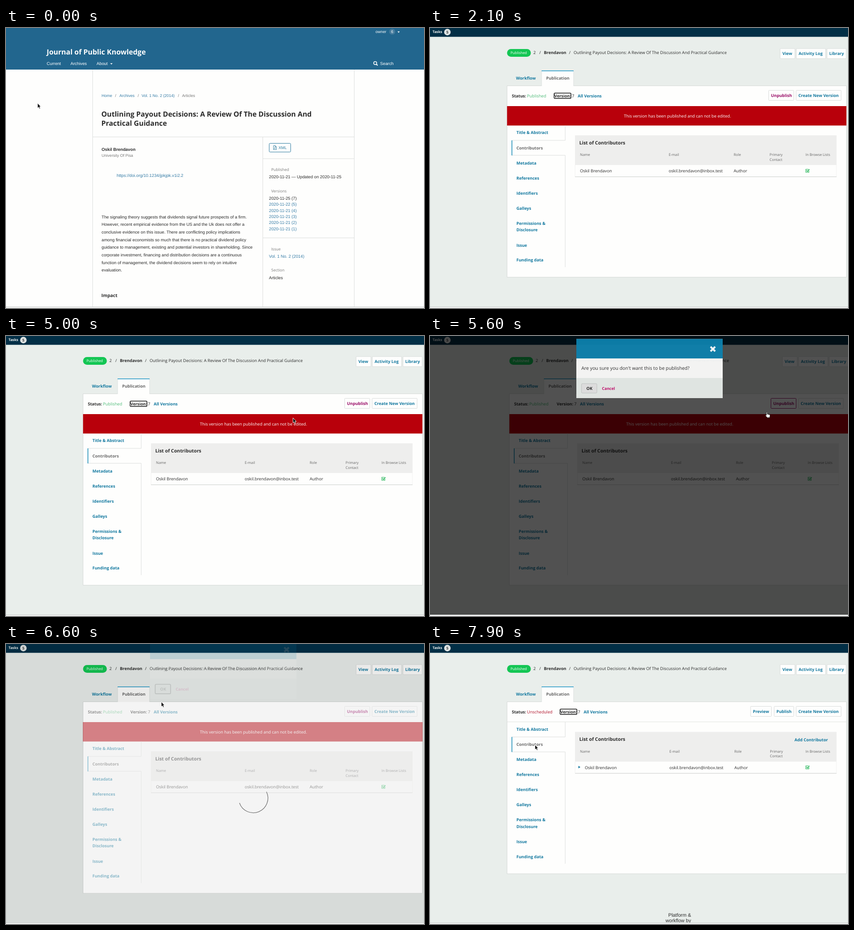
An HTML page for the animation above (8 s loop, 914 by 613 pixels).

```html
<!DOCTYPE html>
<html lang="en">
<head>
<meta charset="utf-8">
<title>Unpublishing a version</title>
<style>
html, body { margin: 0; width: 100%; height: 100%; overflow: hidden; background: #fefefd; }
svg { display: block; width: 914px; height: 613px; }
text { white-space: pre; text-rendering: geometricPrecision; }
.u { font-family: "Open Sans", "Noto Sans", sans-serif; }
.l { font-family: "Liberation Sans", Arial, sans-serif; }
</style>
</head>
<body>
<svg id="stage" viewBox="0 0 914 613" xmlns="http://www.w3.org/2000/svg"></svg>
<script>
const PAPER = '#fefefd', INK = '#2b2b2b', GREY = '#777', LINE = '#dcdedd';
const LINK = '#347ba6', BLUE = '#12789f', PINK = '#980a66';
const AUTHOR = 'Oskil Brendavon', EMAIL = 'oskil.brendavon@inbox.test';
const TITLE = ['Outlining Payout Decisions: A Review Of The Discussion And', 'Practical Guidance'];

// Markup helpers
const esc = s => s.replace(/&/g, '&amp;');
const text = (cls, x, y, s, size, fill, bold) =>
  `<text class="${cls}" x="${x}" y="${y}" font-size="${size}" fill="${fill}" font-weight="${bold ? 700 : 400}">${esc(s)}</text>`;
const L = (x, y, s, size = 9.28, fill = INK, bold) => text('l', x, y, s, size, fill, bold);
const U = (x, y, s, size = 9.13, fill = INK, bold) => text('u', x, y, s, size, fill, bold);
const B = (x, y, s, fill = BLUE, size = 9) => U(x, y, s, size, fill, true);
const box = (x, y, w, h, fill, extra = '') => `<rect x="${x}" y="${y}" width="${w}" height="${h}" fill="${fill}" ${extra}/>`;
const path = (d, stroke, width = 1, fill = 'none') => `<path d="${d}" stroke="${stroke}" stroke-width="${width}" fill="${fill}"/>`;
const group = (id, body) => `<g id="${id}">${body}</g>`;
const caret = (x, y) => path(`M${x} ${y}h5l-2.5 3z`, 'none', 0, '#fff');

function article() {
  const body = [
    'The signaling theory suggests that dividends signal future prospects of a firm.',
    'However, recent empirical evidence from the US and the Uk does not offer a',
    'conclusive evidence on this issue. There are conflicting policy implications',
    'among financial economists so much that there is no practical dividend policy',
    'guidance to management, existing and potential investors in shareholding. Since',
    'corporate investment, financing and distribution decisions are a continuous',
    'function of management, the dividend decisions seem to rely on intuitive',
    'evaluation.'];
  const versions = ['25 (7)', '22 (5)', '21 (4)', '21 (3)', '21 (2)', '21 (1)'];
  const label = (y, s) => U(580, y, s, 8.47, GREY);
  const crumb = (x, s, fill = LINK) => L(x, 151, s, 8.67, fill);
  return box(0, 0, 914, 613, PAPER) + box(0, 0, 914, 91, '#22668e') +
    L(808, 11, 'owner', 8.67, '#fff') +
    '<circle cx="844.5" cy="8" r="6.6" fill="#447b9d"/>' + L(842.1, 11, '6', 8.67, '#fff') + caret(856, 7.5) +
    U(89, 58, 'Journal of Public Knowledge', 15.57, '#fff', true) +
    L(89, 81, 'Current', 9.33, '#fff') + L(141, 81, 'Archives', 9.33, '#fff') +
    L(198, 81, 'About', 9.33, '#fff') + caret(228, 77) +
    '<circle cx="807.3" cy="76.8" r="3.3" fill="none" stroke="#fff" stroke-width="1.6"/>' +
    path('M809.8 79.2l2.8 2.8', '#fff', 2) + L(818, 81, 'Search', 9.33, '#fff') +
    path('M189.5 91V610M761.5 91V610M190 238.5H761M561.5 238V610M562 286H761M562 459.5H761', LINE) +
    crumb(209, 'Home') + crumb(238.5, '/', GREY) + crumb(248, 'Archives') + crumb(288, '/', GREY) +
    crumb(296.5, 'Vol. 1 No. 2 (2014)') + crumb(376, '/', GREY) + crumb(385, 'Articles', GREY) +
    TITLE.map((s, i) => U(208.5, 193.7 + i * 20, s, 15.45, INK, true)).join('') +
    L(209, 269, AUTHOR, 9.33, INK, true) + L(209, 282.3, 'University Of Pisa', 8.67, GREY) +
    L(242, 325.5, 'https://doi.org/10.1234/jpkjpk.v1i2.2', 9.28, LINK) +
    body.map((s, i) => L(209, 416.7 + i * 16.67, s)).join('') +
    U(208.5, 588.8, 'Impact', 10, INK, true) +
    box(575.5, 252.5, 47, 19, PAPER, 'rx="2" stroke="#2b7a9f"') +
    path('M584.9 257.7h4l2.3 2.4v6.2h-6.3zM588.7 257.7v2.6h2.5M586.3 264.8l1.5-3 2 2.4', '#2b7a9f', .9) +
    L(596, 265.2, 'XML', 8.67, '#2b7a9f') +
    label(313, 'Published') + L(575, 329.3, '2020-11-21 — Updated on 2020-11-25') +
    label(359.5, 'Versions') +
    versions.map((s, i) => L(575, 376 + i * 13.33, '2020-11-' + s, 9.28, i ? LINK : INK)).join('') +
    label(486.7, 'Issue') + L(575, 503, 'Vol. 1 No. 2 (2014)', 9.28, LINK) +
    label(533.3, 'Section') + L(575, 550, 'Articles');
}

const button = (x, y, w, s, fill = BLUE, id = '') =>
  box(x + .5, y + .5, w - 1, 22, PAPER, `rx="1" stroke="#d9dcdb" ${id && `id="${id}"`}`) + B(x + 5.5, y + 14.8, s, fill);

function shell() {
  return box(168.5, 46, 52, 17, '#14c654', 'rx="8.5"') + U(176, 57.2, 'Published', 7.8, '#fff') +
    U(226, 57.2, '2') + U(239, 57.2, '/') + B(249, 57.2, 'Brendavon', INK) + U(304, 57.2, '/') +
    U(314, 57.2, TITLE.join(' ')) +
    button(765, 44.5, 33.5, 'View') + button(800.5, 44.5, 65, 'Activity Log') + button(867.5, 44.5, 43, 'Library') +
    B(188, 113, 'Workflow');
}

// Panel body; the editable state sits higher and has extra controls.
function panel(editable) {
  const dy = editable ? -42.5 : 0, dx = editable ? 1.5 : 0, vx = editable ? 285 : 272;
  const nav = [['Title & Abstract', 232.2], ['Metadata', 298.8], ['References', 331.5], ['Identifiers', 364.8],
    ['Galleys', 397.5], ['Permissions &', 430.5], ['Disclosure', 445.2], ['Issue', 478.5], ['Funding data', 511.2]];
  const head = (x, y, s) => U(x, y, s, 7.8, '#666');
  const tools = editable
    ? button(700.5, 136, 46.5, 'Preview') + button(752, 136, 44, 'Publish')
    : button(740, 136, 56, 'Unpublish', PINK, 'unpublish');
  return box(168.5, 126.5, 742, 419 + dy, PAPER, 'stroke="#d6dad8"') +
    box(244, 94, 70, 33.5, PAPER) + path('M244 127V94M314 127V94', '#dce0de') + path('M244 93.8H314', '#1f96c4', 1.6) +
    B(254, 113, 'Publication', '#666') +
    B(179, 151.6, 'Status:', INK) +
    U(212, 151.6, editable ? 'Unscheduled' : 'Published', 9.13, editable ? '#b0122a' : '#4dbb78') +
    B(vx, 151.6, 'Version:', INK) + U(vx + 38.2, 151.6, '7') + B(vx + 51, 151.6, 'All Versions') +
    box(vx - .6, 142.6, 36.8, 11.6, 'none', `rx="2" stroke="#111" stroke-width="1.5" ${editable ? '' : 'id="focus"'}`) +
    tools + button(800, 136, 99.5, 'Create New Version', BLUE, editable ? '' : 'create') +
    (editable ? path('M169 170.5H910', '#e0e3e1')
      : box(168.5, 171, 742, 42.5, '#b8000b') + U(424, 195.6, 'This version has been published and can not be edited.', 9.13, '#fff')) +
    `<g transform="translate(0 ${dy})">` +
    path('M295.7 213.5V246H179M179 278.7H295.7V523.5', LINE) + path('M179.2 246V279', '#1f8fb8', 1.6) +
    nav.map(([s, y]) => B(189, y, s)).join('') + B(189, 265.5, 'Contributors', '#6a6a6a') +
    box(317, 235, 572, 65, '#eeeeed') + path('M317 325.7H889', '#d3d5d4', 1.2) + path('M317.3 300V325M888.7 300V325', '#efefee', .8) +
    B(326.5, 254.8, 'List of Contributors', INK, 10.33) + (editable ? B(797, 255, 'Add Contributor') : '') +
    head(328, 280.3, 'Name') + head(522 + dx, 280.3, 'E-mail') + head(664 + dx, 280.3, 'Role') +
    head(742.5 + dx / 2, 280.3, 'Primary') + head(742.5 + dx / 2, 290.8, 'Contact') + head(821, 280.3, 'In Browse Lists') +
    (editable ? path('M324.5 309.3l4.3 2.7-4.3 2.7z', 'none', 0, BLUE) : '') +
    U(editable ? 338.5 : 328, 316.2, AUTHOR) + U(522 + dx, 316.2, EMAIL) + U(664 + dx, 316.2, 'Author') +
    path('M828.5 312.5v3.5h-6.7v-6.8h6', '#27b65b', 1.1) + path('M823.3 311.8l2.1 2.3 4.3-4.9', '#27b65b', 1.6) +
    '</g>' +
    (editable ? L(521, 597, 'Platform &', 10.7) + L(515, 609, 'workflow by', 10.7) : '');
}

function modal() {
  return box(320, 8.5, 320, 129.5, '#e9eeeb') + box(320, 8.5, 320, 43, '#0d82ae') + box(320, 51.2, 320, 42.8, PAPER) +
    path('M613.5 25.5l10 10M623.5 25.5l-10 10', '#fff', 4) +
    U(331, 76.3, 'Are you sure you don\'t want this to be published?', 10.3) +
    box(331.3, 106.3, 33.6, 20.6, '#e6e6e6', 'rx="2" stroke="#c4c8c6" id="ok"') +
    B(342, 119.6, 'OK', '#222') + B(376, 119.6, 'Cancel', '#c4086a', 8.6);
}

const arrow = path('M.5 .5v11l2.5-2.3 1.7 3.8 1.9-.9-1.7-3.6h3z', '#fff', .9, '#111');
const hand = path('M2.6 7.5V1.6q1-1.5 2 0V5l5 1.2q1.2.4.9 2l-.8 4.6H4.4L.7 8.3q.4-1.4 1.9-.8z', '#222', .9, '#fff');

const stage = document.getElementById('stage');
stage.innerHTML =
  group('article', article()) +
  group('editor', box(0, 0, 914, 613, '#e9eeeb') + box(0, 0, 914, 19.3, '#022f46') +
    U(5.5, 11.3, 'Tasks', 7.8, '#f0f3f3', true) + '<circle cx="38" cy="9" r="7.2" fill="#dde2e2"/>' +
    U(35.7, 11.8, '5', 7.8, '#333', true) +
    group('page', shell() + group('locked', panel(false)) + group('open', panel(true))) +
    box(0, 0, 914, 611, '#000', 'id="shade"') +
    group('loading', box(169, 127, 741, 418.5, '#fff', 'opacity=".5"') +
      group('spin', path('M29 -13.5A32 32 0 1 1 -30 11', '#777', 1.3))) +
    group('modal', modal())) +
  box(0, 611, 914, 2, PAPER) + path('M0 610.7H914', '#c8cbcb', 1.2) +
  group('arrow', arrow) + group('hand', hand);

const $ = id => document.getElementById(id);
const show = (id, on) => { $(id).style.display = on ? '' : 'none'; };
const move = (id, x, y) => $(id).setAttribute('transform', `translate(${x} ${y})`);

// Pointer stops: time, x, y
const stops = [
  [900, 68.5, 164], [1000, 60, 166], [1100, 60, 166], [1600, 2, 27], [2500, 55, 36],
  [2700, 55, 36], [2900, 430, 112], [3100, 845, 179], [3200, 845, 179], [3300, 837, 132], [3400, 839, 138],
  [3500, 839, 138], [3900, 846, 146], [4200, 846, 146], [4400, 740, 205], [4700, 303, 226], [5100, 735, 163],
  [5200, 748, 152], [5300, 743, 161], [5400, 743, 161], [5500, 733, 166], [5800, 733, 166],
  [6200, 400, 130], [6400, 336, 120], [6600, 339, 126], [7000, 306, 166], [7400, 244, 210], [7900, 229, 220]];
// Time, opacity
const shades = [[5400, 0], [5500, .38], [5600, .68], [5700, .76], [6000, .8], [6400, .8], [6500, .45], [6600, .08], [6700, 0]];
// Time, opacity, vertical offset
const drops = [[5400, 0, -18], [5500, .5, -8], [5600, .94, -2], [5700, 1, 0], [6400, 1, 0], [6500, .6, -8], [6600, .13, -18], [6700, 0, -24]];

function at(table, t) {
  const i = table.findIndex(r => r[0] > t);
  if (i < 0) return table[table.length - 1].slice(1);
  if (i === 0) return table[0].slice(1);
  const a = table[i - 1], b = table[i], k = (t - a[0]) / (b[0] - a[0]);
  return a.slice(1).map((v, j) => v + (b[j + 1] - v) * k);
}

function draw(t) {
  const within = (a, b) => t >= a && t < b;
  const done = t >= 7200, shift = within(5500, 6500) ? 5 : 0;
  show('article', t < 2100);
  show('editor', t >= 2100);
  show('locked', !done);
  show('open', done);
  move('page', shift, 0);

  show('focus', t < 5500);
  $('create').setAttribute('stroke', within(3400, 4300) ? BLUE : '#d9dcdb');
  $('unpublish').setAttribute('stroke', within(5200, 5700) ? PINK : '#d9dcdb');

  $('shade').setAttribute('opacity', at(shades, t)[0]);
  const [alpha, dy] = at(drops, t);
  show('modal', alpha > 0);
  $('modal').setAttribute('opacity', alpha);
  move('modal', shift - 5, dy);
  $('ok').setAttribute('stroke', t >= 6300 ? '#111' : '#c4c8c6');
  $('ok').setAttribute('stroke-width', t >= 6300 ? 1.6 : 1);

  show('loading', within(6500, 7200));
  $('spin').setAttribute('transform', `translate(540.5 337) rotate(${(t - 6600) * .36})`);

  const [x, y] = at(stops, t);
  const grip = within(3400, 4300) || within(5200, 5700) || within(6300, 6600);
  const seen = t < 1700 || t >= 2600;
  show('arrow', seen && !grip);
  show('hand', seen && grip);
  move('arrow', x, y);
  move('hand', x, y);
}

const start = performance.now();
function tick() {
  const t = (performance.now() - start) % 8000;
  draw(Math.floor(t / 100) * 100);
  requestAnimationFrame(tick);
}
tick();
</script>
</body>
</html>
```
